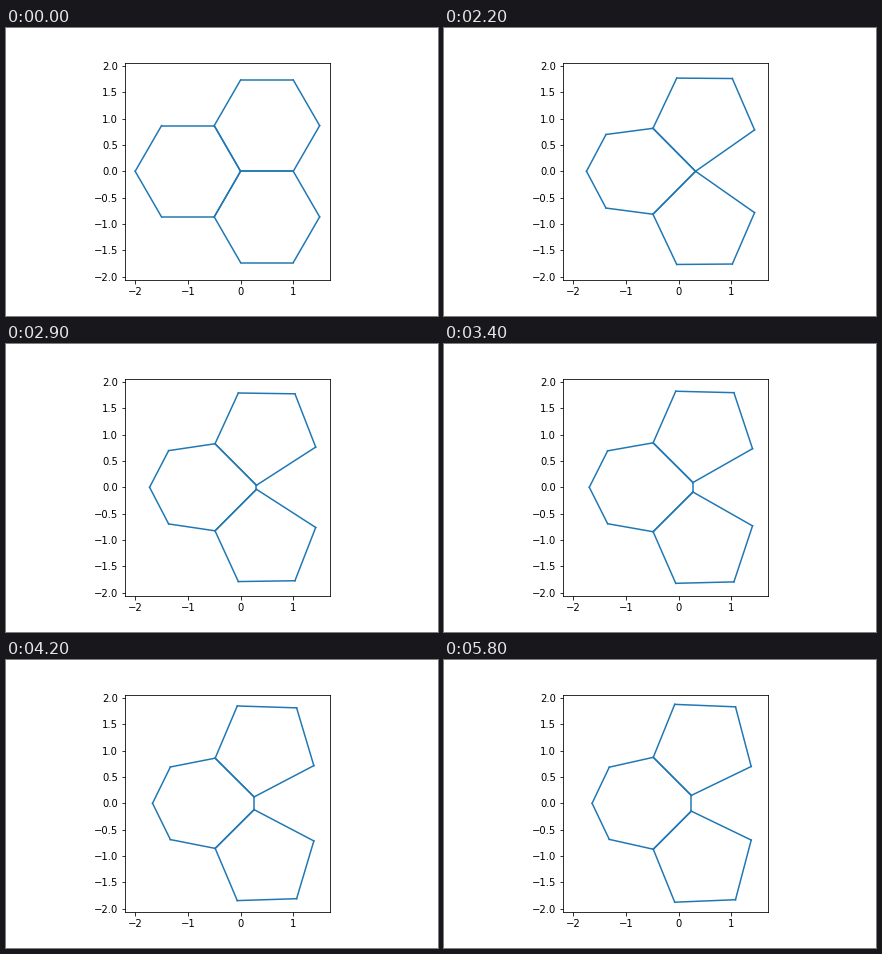
A matplotlib script for the animation above (6000 ms loop, 432 by 288 pixels).

```python
from itertools import zip_longest

import numpy as np
import matplotlib.pyplot as plt
from matplotlib.animation import FuncAnimation

FRAMES = 60
INTERVAL = 100      # ms
SWAP = 22           # frame at which the collapsed edge turns vertical
SLOW_FROM = 24      # from here on the picture is redrawn every HOLD frames
HOLD = 4
LAST = 58           # last redraw
NEAR, FAR = 15, 25  # relaxation times near to and far from the junction
MAX_EDGES = 19

# Points are complex numbers x + yj; only the upper half is described.


def hexagon(center):
    return center + np.exp(1j * np.pi / 3 * np.arange(6))


def relax(start, end, t, tau):
    """Exponential approach that reaches end at the last redraw."""
    return start + (end - start) * np.expm1(-t / tau) / np.expm1((SWAP - LAST) / tau)


def cells(step):
    """Return the outlines of the left, upper and lower cells."""
    if step == 0:
        upper = hexagon(0.5 + 0.75 ** 0.5 * 1j)
        return hexagon(-1), upper, upper.conj()

    t = max(step - SWAP, 0)
    inner = outer = relax(0.322, 0.241 + 0.149j, t, NEAR)
    if step < SWAP:
        inner, outer = inner - 0.015, outer + 0.015
    right = relax(1.442 + 0.785j, 1.378 + 0.698j, t, NEAR)
    top_right = relax(1.02 + 1.76j, 1.08 + 1.83j, t, FAR)
    top_left = relax(-0.035 + 1.768j, -0.073 + 1.877j, t, FAR)
    shoulder = relax(-0.486 + 0.815j, -0.48 + 0.872j, t, FAR)
    cheek = relax(-1.377 + 0.698j, -1.315 + 0.685j, t, FAR)
    tip = relax(-1.747, -1.641, t, FAR)

    upper = np.array([inner, outer, right, top_right, top_left, shoulder])
    flank = np.array([cheek, shoulder, inner])
    left = np.concatenate([[tip], flank, flank[::-1].conj()])
    return left, upper, upper.conj()


def edges(step):
    return [edge for cell in cells(step)
            for edge in zip(cell, np.roll(cell, -1)) if edge[0] != edge[1]]


def redraw_step(frame):
    if frame < SWAP:
        return min(frame, 1)
    if frame < SLOW_FROM:
        return frame
    return max(SLOW_FROM, frame - (frame - LAST) % HOLD)


fig, ax = plt.subplots(figsize=(6, 4), dpi=72, facecolor="white")
fig.subplots_adjust(left=0.125, right=0.9, bottom=0.125, top=0.88)
ax.set_aspect("equal")
ax.set_xlim(-2.1925, 1.6925)
ax.set_ylim(-2.063, 2.063)
ax.set_xticks(range(-2, 2))
ax.set_yticks(np.arange(-2, 2.1, 0.5))
lines = [ax.plot([], [], color="C0", lw=1.5)[0] for _ in range(MAX_EDGES)]


def update(frame):
    for line, edge in zip_longest(lines, edges(redraw_step(frame)), fillvalue=()):
        line.set_data(np.real(edge), np.imag(edge))
    return lines


anim = FuncAnimation(fig, update, frames=FRAMES, interval=INTERVAL,
                     init_func=lambda: update(0), repeat=True, repeat_delay=0)
plt.show()
```
